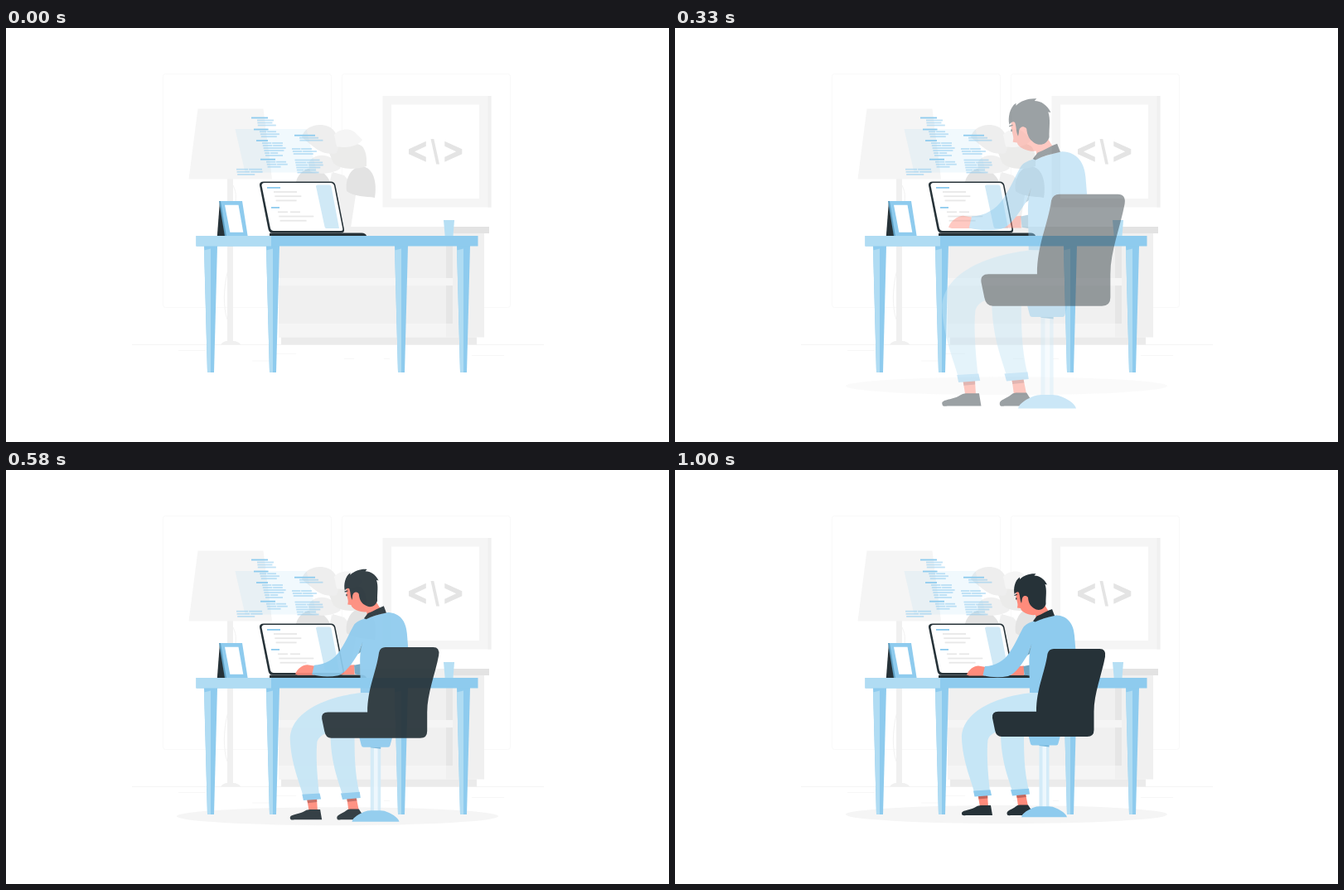
Write an HTML page with a canvas that moves like this. It is 800x500 px and loops after 1.04 s.

```html
<!DOCTYPE html>
<html lang="en">
<head>
<meta charset="utf-8">
<title>Desk scene</title>
<style>
  html, body { margin: 0; width: 100%; height: 100%; overflow: hidden; background: #fff; }
  canvas { display: block; width: 800px; height: 500px; }
</style>
</head>
<body>
<canvas id="stage" width="800" height="500"></canvas>
<script>
const W = 800, H = 500, LOOP = 1040, FPS = 24;
const BLUE = '#8ecbee', PALE = '#b0dcf3', LIGHT = '#c6e6f6', DARK = '#263238', SKIN = '#ff8b7b';
const stage = document.getElementById('stage').getContext('2d');

function layer() {
  const c = document.createElement('canvas');
  c.width = W;
  c.height = H;
  return c.getContext('2d');
}

function fill(g, color, d) {
  g.fillStyle = color;
  g.fill(new Path2D(d));
}

function line(g, color, width, d) {
  g.strokeStyle = color;
  g.lineWidth = width;
  g.stroke(new Path2D(d));
}

function rect(g, color, x1, y1, x2, y2) {
  g.fillStyle = color;
  g.fillRect(x1, y1, x2 - x1, y2 - y1);
}

function box(g, color, x, y, w, h, r) {
  g.strokeStyle = color;
  g.lineWidth = 1;
  g.beginPath();
  g.roundRect(x, y, w, h, r);
  g.stroke();
}

// A block of text bars: indent and length of each row, slanted with the panel.
function bars(g, color, x, y, gap, lengths, slant) {
  lengths.forEach((len, i) => {
    const left = x + i * slant, top = y + i * gap;
    rect(g, color, left, top - 0.9, left + len, top + 0.9);
  });
}

function drawRoom(g) {
  rect(g, '#fff', 0, 0, W, H);
  box(g, '#f9f9f9', 189.5, 55.5, 203, 282, 3);
  box(g, '#f9f9f9', 405.5, 55.5, 203, 282, 3);
  line(g, '#f5f5f5', 1, 'M152 382.5H649');
  line(g, '#f7f7f7', 1, 'M208 389.5H241M297 402H318M320 393.5H350M408 399.5H420M456 399.5H463M562 395.5H601');

  drawLamp(g);
  drawPicture(g);
  drawCabinet(g);
  drawPlant(g);
}

function drawLamp(g) {
  line(g, '#f2f2f2', 1, 'M274 190C279 200 278 210 274 222M268 292C262 314 262 338 267 352');
  rect(g, '#f0f0f0', 267, 182, 274, 379);
  fill(g, '#f0f0f0', 'M259 382.5Q262 378 267 378H274Q280 378 283.5 382.5Z');
  fill(g, '#f5f5f5', 'M231.5 97.5H310.5L321 182.5H220.5Z');
}

function drawPicture(g) {
  rect(g, '#f5f5f5', 454.5, 82, 585.5, 216.5);
  rect(g, '#f0f0f0', 581.5, 82, 585.5, 216.5);
  rect(g, '#fff', 465, 92.5, 571, 206);
  const ink = '#e4e4e4';
  fill(g, ink, 'M486 146.3L506.8 136.8V142.8L493 149.3L506.8 155.8V161.8L486 152.3Z');
  fill(g, ink, 'M512.5 134H516.3L523 164.5H519.2Z');
  fill(g, ink, 'M529.3 136.8L550.3 146.3V152.3L529.3 161.8V155.8L543.2 149.3L529.3 142.8Z');
}

function drawCabinet(g) {
  rect(g, '#f0f0f0', 329, 248, 577, 373.5);
  rect(g, '#ebebeb', 332, 373.5, 568, 382.5);
  rect(g, '#e6e6e6', 531, 263, 539, 357);
  rect(g, '#f5f5f5', 329, 302, 539, 311);
  rect(g, '#f5f5f5', 329, 357, 531, 373.5);
  rect(g, '#f0f0f0', 398, 240, 540, 248);
  rect(g, '#e3e3e3', 540, 240, 583, 248);
}

function drawPlant(g) {
  fill(g, '#e3e3e3', 'M349 190C351 176 361 168 371 170C384 172 394 183 393 199C388 207 378 207 370 203C360 199 350 199 349 190Z');
  fill(g, '#f0f0f0', 'M391 184L394 174L408 178L423 195L416 241H398Z');
  fill(g, '#e3e3e3', 'M411 197C409 181 417 167 430 167C443 169 448 185 445 205C434 203 420 204 411 197Z');
  fill(g, '#f0f0f0', 'M365 164C368 154 383 150 394 158L404 169C397 176 376 178 367 173Z');
  fill(g, '#ebebea', 'M390 151C398 139 418 135 430 143C436 151 435 160 435 167C422 171 404 172 395 163Z');
  fill(g, '#eeeeee', 'M357 132C360 119 376 114 389 119C401 124 404 142 399 151C386 154 376 148 368 141Z');
  fill(g, '#f5f5f5', 'M396 129C402 121 417 120 423 128L430 135C423 145 406 145 399 143Z');
}

function drawCode(g) {
  g.save();
  g.globalAlpha = 0.12;
  fill(g, BLUE, 'M276.5 122H362.5L375 174.5H288.5Z');
  g.restore();

  const soft = 'rgba(142,203,238,.55)';
  bars(g, BLUE, 296, 108.5, 0, [20], 0);
  bars(g, soft, 303, 111.5, 3, [20, 18, 22], 0.4);
  bars(g, BLUE, 299, 122.5, 0, [17.5], 0);
  bars(g, soft, 306, 125.2, 3, [20, 23, 19], 0.9);
  bars(g, BLUE, 302, 136, 0, [14], 0);
  bars(g, soft, 309, 139, 3, [25, 24, 27, 24, 16, 21], 0.8);
  bars(g, BLUE, 307, 158.7, 0, [18], 0);
  bars(g, soft, 314, 161.7, 3, [24, 25, 16], 0.8);
  bars(g, soft, 278, 170.7, 3.1, [31, 31, 21], 0.6);

  bars(g, BLUE, 348, 129.7, 0, [25], 0);
  bars(g, soft, 354, 132.7, 3, [23, 28], 0.4);
  bars(g, soft, 345, 146, 3, [24, 29, 24], 0.9);
  bars(g, soft, 348.5, 159.5, 3, [30, 33, 33, 29, 23, 26], 0.6);

  g.fillStyle = 'rgba(255,255,255,.55)';
  [[314, 125.2], [320, 139], [321, 142], [318, 151], [325, 161.7], [326, 164.7],
   [292, 170.7], [294, 173.8], [355, 146], [357, 149], [362, 162.5], [364, 165.5], [359, 171.5]]
    .forEach(([x, y]) => g.fillRect(x, y - 1, 1.2, 2));
}

function drawLaptop(g) {
  fill(g, DARK, 'M311 185.5H392Q396.500 185.5 397.500 190L408 243Q408.600 247.500 404 247.500H322Q317.500 247.500 316.500 243L306 190Q305.500 185.500 311 185.500Z');
  fill(g, '#fff', 'M312 187H391.500Q395 187 396 190.500L406.300 242.500Q406.700 245 404 245H323Q320 245 319 242L308.600 190.500Q308.300 187 312 187Z');
  fill(g, '#d0e9f6', 'M374 191Q374 189.500 376 189.500H390Q392 189.500 392.500 191.500L402 242H386.500Q385 242 384.500 240Z');
  rect(g, BLUE, 315, 192, 331, 193.8);
  rect(g, BLUE, 320, 216, 330, 217.800);
  const gray = '#e8e8e8';
  bars(g, gray, 323, 198, 5.200, [28, 32, 25], 1.300);
  bars(g, gray, 328, 222.300, 5.200, [12, 42, 32], 1.300);
  bars(g, gray, 343, 222.300, 0, [12], 0);
  fill(g, DARK, 'M318 251V248.500Q318 247.500 320 247.500H429Q434 247.500 435 251Z');
}

function drawDesk(g) {
  // photo stand
  fill(g, DARK, 'M258 209L254.800 251.500H267Z');
  fill(g, '#5f9fc2', 'M257 209H262L269 251.500H264Z');
  fill(g, BLUE, 'M259 209H285L291.700 251.500H266Z');
  fill(g, '#fff', 'M264 213.700H280.500L286.300 246.700H270.300Z');

  fill(g, '#b6dff4', 'M528 232H541L539.500 251.500H529.700Z');

  for (const x of [239, 314, 469, 544]) {
    fill(g, BLUE, `M${x} 263H${x + 16}L${x + 12} 416H${x + 4}Z`);
    fill(g, PALE, `M${x} 268.500L${x + 8} 266.500V416H${x + 4}Z`);
  }
  rect(g, BLUE, 229.500, 251, 569.500, 263.500);
  rect(g, PALE, 229.500, 251, 320, 263.500);
  drawLaptop(g);
}

function drawPerson(g) {
  // chair stem and foot
  rect(g, '#d3ebf8', 439.500, 330, 451.500, 409);
  rect(g, '#edf7fd', 443.500, 330, 448, 409);
  fill(g, '#75b5da', 'M439.500 332H451.500V334.500L439.500 333Z');

  // ankles
  fill(g, SKIN, 'M365.500 392H377L378 407H368Z M412 391H423L426 406H414Z');
  fill(g, '#c4655b', 'M365.800 393.500L377.200 392.500V396.500L366.500 397.500Z M412 392.300L423 391.300L423.700 395L412.700 396.200Z');
  // shoes
  fill(g, DARK, 'M346 415C345 411 355 411 361 408Q365 405 369 405H381L383 417H351Q346 418 346 415Z');
  fill(g, DARK, 'M400.500 415C400 411 407 410 411 406.500Q413 404.500 416 404.500H426L429.500 410L420 417H405Q400.500 418 400.500 415Z');
  fill(g, BLUE, 'M418 419.300C419 414 427 410 433 407.500Q436 406.300 440 406.300H451Q456 406.300 460 408.500C466 411 472 415 473 419.300Z');

  // trousers and cuffs
  fill(g, LIGHT, 'M393 316C393 350 402 371 407 388L427 387C421 362 421 340 421 316Z');
  fill(g, LIGHT, 'M440 268.500C400 270 346 287 346 324C347 352 358 376 361 389L380 388C377 362 376 340 377.500 326Q379 320 388 316H445Z');
  fill(g, BLUE, 'M360 387.500L380.500 386.300L382 393L361.500 394.500Z M405 386.300L427 384.700L428 391.500L407 393.500Z');

  // far hand
  fill(g, SKIN, 'M403 248C406 244 411 240 415 237L421 236.500V248Z');
  fill(g, '#6ea6c4', 'M420.500 237L428 235.500V248.500L421.500 247.500Z');

  // shirt
  fill(g, SKIN, 'M352 247.500C354 241 361 236.500 366 236.500L375 238L374 248.500H355Z');
  fill(g, BLUE, 'M433 182.500C445 180 454 175.500 460 175.500C474 176 481 186 482 200L484 225L470 290L440 269H428L427.500 236C427 226 428 219 430 211L425 224C418 235 411 246 402 249C392 251 381 250.500 371.500 248L374 237C386 237 398 230 404 220C412 208 417 195 421 189C425 185 429 184 433 182.500Z');
  fill(g, '#6ea6c4', 'M430.300 210L425 224L428 222Z');

  // head
  fill(g, SKIN, 'M412 145C410 154 413.500 158 413.500 163L413 166.500L417 167C418 172 428 176 435 175L436 181L451 171L446 163L440 150Z');
  fill(g, DARK, 'M409.700 150C408 144 410 133 416 129.500L416 132C421 127 428 124.800 435.500 125.300L433.500 127.500C440 127.500 445.500 131.500 449 138.500L446.500 138C449 145 447.300 152 447.500 162C445 169.500 438 170.500 433 167C428.500 164 426.500 160 426 154C424 151 420.500 152 419 156L418 161C416 157 416.500 152 415 148C413.500 146.500 411.500 147.500 409.700 150Z');
  g.fillStyle = SKIN;
  g.beginPath();
  g.ellipse(422.300, 157, 3.600, 5, 0, 0, Math.PI * 2);
  g.fill();
  line(g, DARK, 1.200, 'M409.500 151.500L413 150.300M411.800 154.300V156.500');
  fill(g, DARK, 'M432 182.500L436.500 176.500C443 174 449 170 455 168L458 176C449 178 441 180 434.500 183.500Z');

  // chair
  fill(g, BLUE, 'M426.500 321H465L462.500 330Q462 332.500 460 332.500H431.500Q429.300 332.500 428.800 330Z');
  fill(g, DARK, 'M457 216H512.500Q520.500 216 519 225.500C515 247 505.500 270 505.500 292V314Q505.500 322 497.500 322H394Q387.500 322 386 314L383 299.500Q382 291.800 390 291.800H436C436 264 446 246 449.500 222Q451 216 457 216Z');
}

// Cubic easing with an overshoot; solve x for s by bisection.
const curve = (a, b, s) => 3 * (1 - s) ** 2 * s * a + 3 * (1 - s) * s * s * b + s ** 3;
function ease(x) {
  if (x >= 1) return 1;
  let lo = 0, hi = 1;
  for (let i = 0; i < 30; i++) {
    const mid = (lo + hi) / 2;
    if (curve(0.36, 0.5, mid) < x) lo = mid; else hi = mid;
  }
  return curve(-0.01, 1.38, lo);
}

const room = layer(), desk = layer(), person = layer();
drawRoom(room);
drawCode(desk);
drawDesk(desk);

function render(step) {
  const p = step < 2 ? 0 : ease((step + 0.7) / FPS);
  const alpha = Math.min(1, p);

  stage.drawImage(room.canvas, 0, 0);
  stage.globalAlpha = alpha;
  stage.fillStyle = '#f5f5f5';
  stage.beginPath();
  stage.ellipse(400, 416 + 30 * (1 - p), 194, 11, 0, 0, Math.PI * 2);
  stage.fill();
  stage.globalAlpha = 1;
  stage.drawImage(desk.canvas, 0, 0);
  if (!alpha) return;

  const scale = 1.5 - 0.5 * p, cx = 432.6, cy = 272;
  person.setTransform(1, 0, 0, 1, 0, 0);
  person.clearRect(0, 0, W, H);
  person.setTransform(scale, 0, 0, scale, cx * (1 - scale), cy * (1 - scale));
  drawPerson(person);
  stage.globalAlpha = alpha;
  stage.drawImage(person.canvas, 0, 0);
  stage.globalAlpha = 1;
}

let shown = -1;
const start = performance.now();
function tick() {
  const t = (performance.now() - start) % LOOP;
  const step = Math.min(FPS, Math.floor(t * FPS / 1000 + 0.1));
  if (step !== shown) render(shown = step);
  requestAnimationFrame(tick);
}
tick();
</script>
</body>
</html>
```
